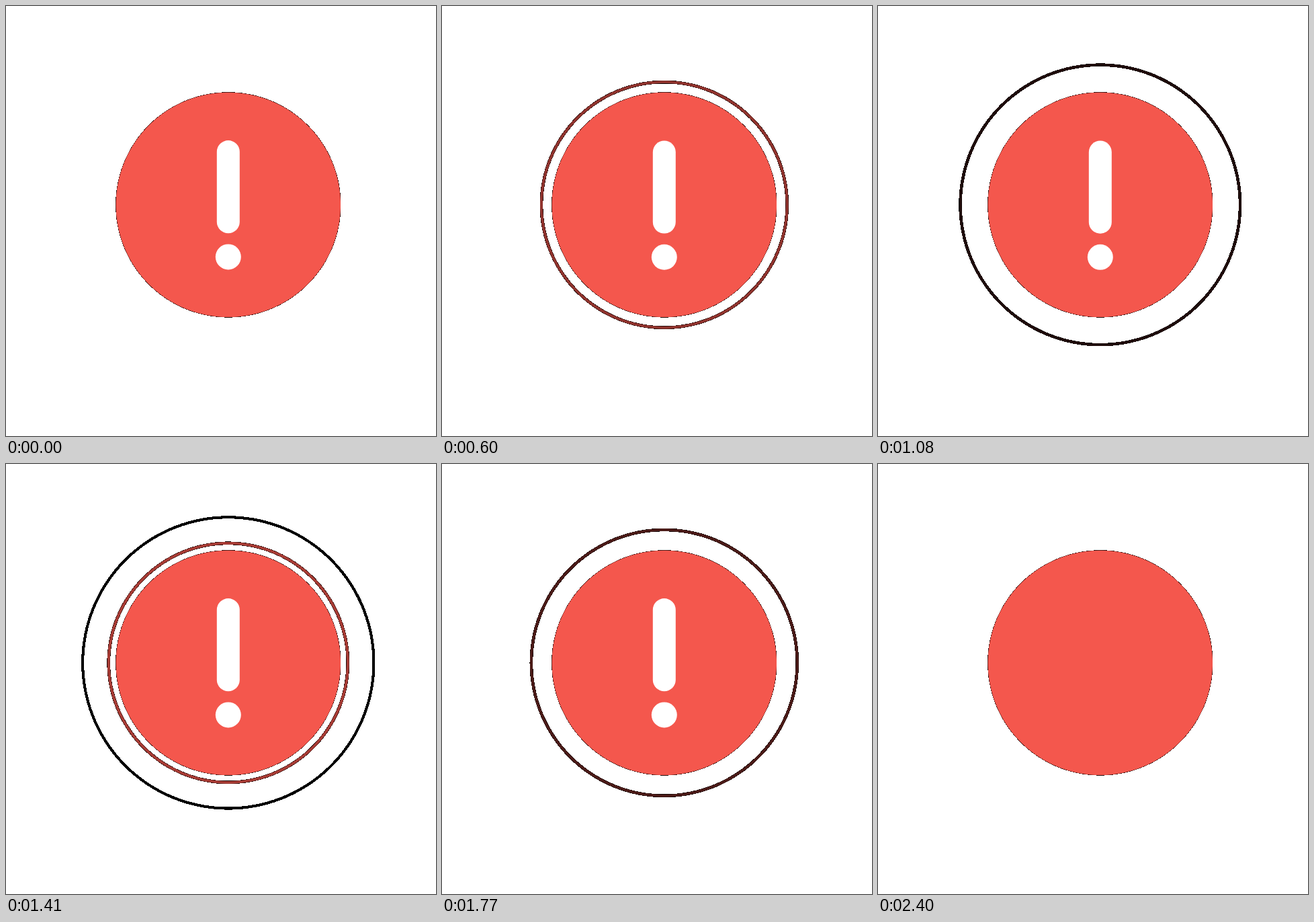
Animation, 640 px wide and 640 px high, one loop 2430 ms. Source, as an HTML page with a canvas:

```html
<!DOCTYPE html>
<html lang="en">
<head>
<meta charset="utf-8">
<title>Alert pulse</title>
<style>
  html, body { margin: 0; width: 100%; height: 100%; overflow: hidden; background: #fff; }
  canvas { display: block; width: 640px; height: 640px; }
</style>
</head>
<body>
<canvas id="stage" width="640" height="640"></canvas>
<script>
const ctx = document.getElementById('stage').getContext('2d');
const LOOP = 2430, STEP = 30;
const CX = 330.8, CY = 295.9, DISC = 167.25;
const RED = [244, 87, 77];
const RING = { from: 164.4, to: 218.7, width: 4, life: 1440, starts: [0, 900] };
const BOX = { x: 111, y: 76, size: 440 };

const clamp = v => Math.max(0, Math.min(1, v));
const smooth = u => u * u * (3 - 2 * u);

// Distance of every pixel centre in the box from the disc centre
const dist = new Float32Array(BOX.size * BOX.size);
for (let i = 0; i < dist.length; i++) {
  const x = BOX.x + i % BOX.size + 0.5;
  const y = BOX.y + Math.floor(i / BOX.size) + 0.5;
  dist[i] = Math.hypot(x - CX, y - CY);
}
const img = ctx.createImageData(BOX.size, BOX.size);

function ringsAt(t) {
  return RING.starts
    .map(start => (t - start) / RING.life)
    .filter(u => u >= 0 && u < 1)
    .map(u => {
      const k = smooth(u);
      return {
        outer: RING.from + (RING.to - RING.from) * k,
        alpha: Math.pow(1 - k, 1.1)
      };
    });
}

// Shapes fade towards black, with hard outer edges on white
function drawCircles(rings) {
  const px = img.data;
  for (let i = 0; i < dist.length; i++) {
    const d = dist[i];
    let cover = clamp(DISC - d + 0.5);
    let solid = cover > 0.05;
    if (cover < 1) {
      for (const { outer, alpha } of rings) {
        const c = Math.min(clamp(outer - d + 0.5), clamp(d - outer + RING.width + 0.5));
        if (c * (alpha + 0.1) > 0.045) solid = true;
        cover = 1 - (1 - cover) * (1 - c * alpha);
      }
    }
    const p = i * 4;
    for (let k = 0; k < 3; k++) px[p + k] = solid ? RED[k] * cover : 255;
    px[p + 3] = 255;
  }
  ctx.putImageData(img, BOX.x, BOX.y);
}

// Slight dip of the mark around the middle of the first pulse
function dip(t) {
  return t < 750 ? smooth(clamp((t - 480) / 270)) : 1 - smooth(clamp((t - 750) / 600));
}

function drawMark(dy) {
  const x = 330.8;
  ctx.fillStyle = ctx.strokeStyle = '#fff';
  ctx.lineWidth = 34;
  ctx.lineCap = 'round';
  ctx.beginPath();
  ctx.moveTo(x, 217.1 + dy);
  ctx.lineTo(x, 321.2 + dy);
  ctx.stroke();
  ctx.beginPath();
  ctx.arc(x, 373.4 + dy, 19, 0, Math.PI * 2);
  ctx.fill();
}

function draw(t) {
  drawCircles(ringsAt(t));
  if (t < 2400) drawMark(dip(t));
}

ctx.fillStyle = '#fff';
ctx.fillRect(0, 0, 640, 640);
const begin = performance.now();
let last = -1;
function tick() {
  const t = Math.floor(((performance.now() - begin) % LOOP) / STEP) * STEP;
  if (t !== last) draw(last = t);
  requestAnimationFrame(tick);
}
tick();
</script>
</body>
</html>
```
